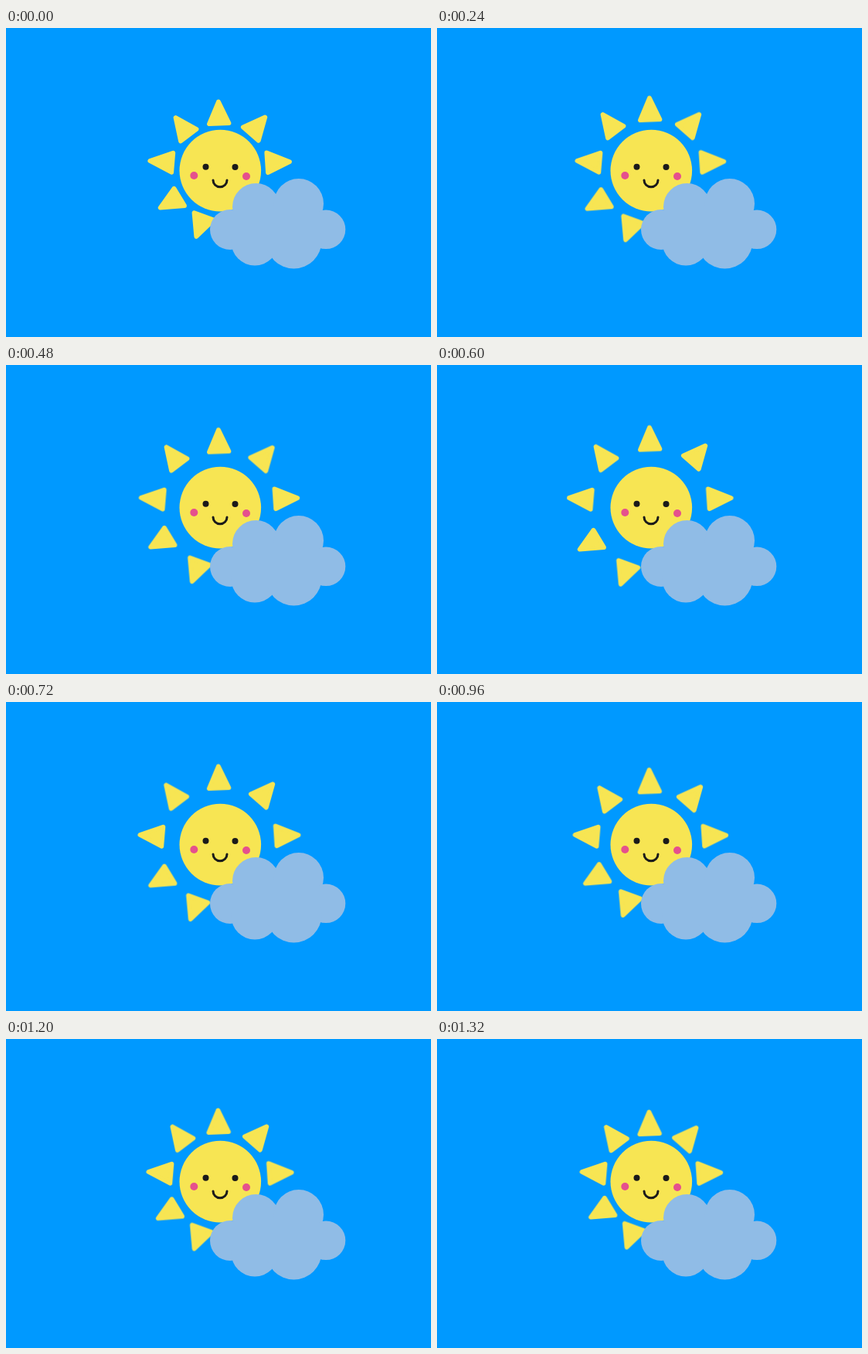
Recreate the animation shown at these times as an HTML page. Size 550 by 400 pixels, loop 1360 ms.

```html
<!DOCTYPE html>
<html lang="en">
<head>
<meta charset="utf-8">
<title>Sun and cloud</title>
<style>
html, body { margin: 0; width: 100%; height: 100%; overflow: hidden; background: #09f; }
svg { display: block; width: 550px; height: 400px; }
.sun { fill: #f7e553; }
.rays path {
  stroke: #f7e553; stroke-width: 5.8; stroke-linejoin: round;
  animation: pulse 1360ms infinite;
}
.cheeks { fill: #e5508d; }
.eyes { fill: #1a1a1a; }
.smile { fill: none; stroke: #1a1a1a; stroke-width: 3; stroke-linecap: round; }
.cloud { fill: #90bce6; }

/* out (o), peak (p), halfway back (m) and end (e) offsets of each ray */
@keyframes pulse {
  0% { transform: translate(0, 0); animation-timing-function: step-end; }
  8.823% {
    transform: translate(calc(var(--ox) * .13), calc(var(--oy) * .13));
    animation-timing-function: steps(3, end);
  }
  35.294% { transform: translate(var(--ox), var(--oy)); animation-timing-function: step-end; }
  44.117% { transform: translate(var(--px), var(--py)); animation-timing-function: steps(4, end); }
  79.411% { transform: translate(var(--mx), var(--my)); animation-timing-function: steps(2, end); }
  97.058%, 100% { transform: translate(var(--ex), var(--ey)); animation-timing-function: step-end; }
}
.top {
  --ox: 0px; --oy: -11.5px; --px: 0px; --py: -14.5px;
  --mx: -.5px; --my: -5.3px; --ex: -.5px; --ey: -.9px;
}
.top-right {
  --ox: 9.5px; --oy: -8.5px; --px: 12px; --py: -11px;
  --mx: 3.9px; --my: -3.8px; --ex: .2px; --ey: -.5px;
}
.right {
  --ox: 10.2px; --oy: -1px; --px: 13.6px; --py: -1px;
  --mx: 5px; --my: -.5px; --ex: .2px; --ey: -.3px;
}
.bottom {
  --ox: -5.5px; --oy: 10.3px; --px: -8.5px; --py: 13.8px;
  --mx: -4.6px; --my: 3.5px; --ex: -.7px; --ey: -.4px;
}
.bottom-left {
  --ox: -12.5px; --oy: 3px; --px: -15px; --py: 6px;
  --mx: -5.2px; --my: 1px; --ex: -.6px; --ey: -2px;
}
.left {
  --ox: -11.5px; --oy: -.2px; --px: -15.5px; --py: 0px;
  --mx: -5px; --my: 0px; --ex: 1.3px; --ey: 0px;
}
.top-left {
  --ox: -12px; --oy: -9.8px; --px: -14px; --py: -10.4px;
  --mx: -7.7px; --my: -3px; --ex: -.6px; --ey: -2px;
}
</style>
</head>
<body>
<svg viewBox="0 0 550 400">
  <g class="sun">
    <g class="rays">
      <path class="top" d="M275 95.4L263 124.2L288.5 123.2Z"/>
      <path class="top-right" d="M335.3 115.5L306.8 128.3L326.8 145.7Z"/>
      <path class="right" d="M337.3 161.5L367 173.2L339 187.2Z"/>
      <path class="bottom" d="M243.5 239.2L246.3 270L268.8 248.5Z"/>
      <path class="bottom-left" d="M217.5 207.8L199.7 232.7L231 230Z"/>
      <path class="left" d="M186.3 172L216.3 161.7L214.2 186.8Z"/>
      <path class="top-left" d="M219.5 116L246.5 131L226 146.5Z"/>
    </g>
    <circle cx="277.3" cy="184.6" r="52.8"/>
  </g>
  <g class="cheeks">
    <circle cx="243.3" cy="191" r="5"/>
    <circle cx="311" cy="192" r="5"/>
  </g>
  <g class="eyes">
    <circle cx="258.5" cy="179.8" r="4"/>
    <circle cx="296.5" cy="180" r="4"/>
  </g>
  <path class="smile" d="M268 197A9 8.8 0 0 0 286 197"/>
  <g class="cloud">
    <circle cx="323.5" cy="231.5" r="30.5"/>
    <circle cx="378.8" cy="227.3" r="32.2"/>
    <circle cx="290" cy="261" r="26"/>
    <circle cx="414" cy="260.8" r="25.3"/>
    <circle cx="322" cy="277" r="30.5"/>
    <circle cx="372.5" cy="275.5" r="36"/>
    <rect x="300" y="235" width="105" height="50"/>
  </g>
</svg>
</body>
</html>
```
